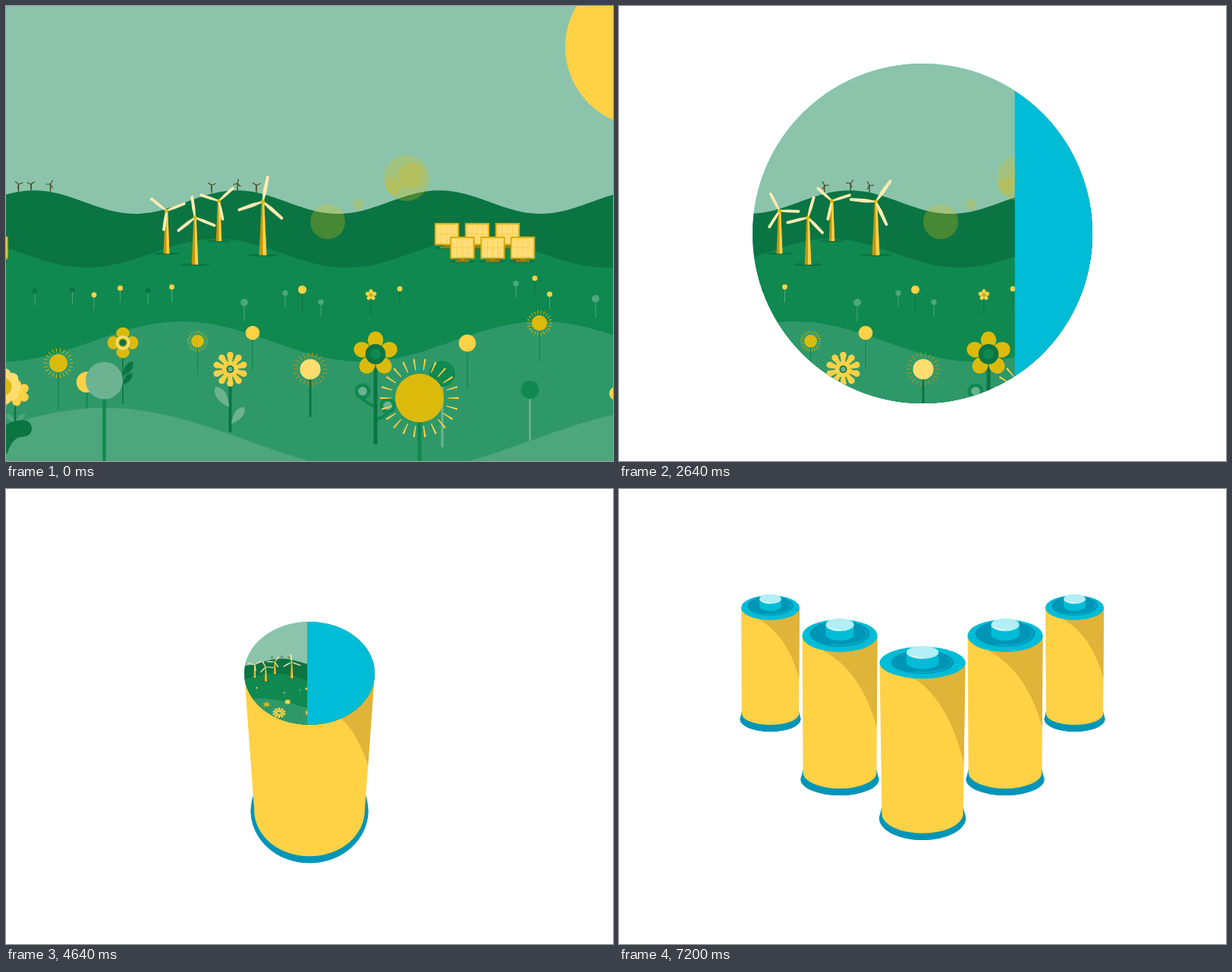
Recreate the animation shown at these times as an HTML page with a canvas. Size 800x600 px, loop 8 s.

```html
<!DOCTYPE html>
<html lang="en">
<head>
<meta charset="utf-8">
<title>Green energy</title>
<style>
  html, body { margin: 0; overflow: hidden; background: #fff; }
  canvas { display: block; }
</style>
</head>
<body>
<canvas id="stage" width="800" height="600"></canvas>
<script>
const ctx = document.getElementById('stage').getContext('2d');
const TAU = Math.PI * 2, RAD = Math.PI / 180, LOOP = 8000;
const SKY = '#8bc4aa', DARK = '#0b7443', GREEN = '#0f894f', MID = '#2f9869', LIGHT = '#4da67c', PALE = '#6db391';
const YELLOW = '#ffd145', SOFT = '#ffdc70', GOLD = '#dcba0c', CREAM = '#fdebb2', SHADE = '#dfb439';
const CYAN = '#00bcd6', BLUE = '#0095b7', ICE = '#b2eef6';

// Smooth monotone curve through [time, value] keys
function track(t, ...keys) {
  const last = keys.length - 1;
  if (t <= keys[0][0]) return keys[0][1];
  if (t >= keys[last][0]) return keys[last][1];
  const i = keys.findIndex(k => k[0] > t) - 1;
  const slope = j => (keys[j + 1][1] - keys[j][1]) / (keys[j + 1][0] - keys[j][0]);
  const tangent = j => {
    if (j === 0 || j === last) return 0;
    const a = slope(j - 1), b = slope(j);
    return a * b > 0 ? 2 * a * b / (a + b) : 0;
  };
  const [t0, v0] = keys[i], [t1, v1] = keys[i + 1], h = t1 - t0, u = (t - t0) / h;
  return v0 + (v1 - v0) * u * u * (3 - 2 * u)
    + h * u * (1 - u) * (tangent(i) * (1 - u) - tangent(i + 1) * u);
}

function ellipse(x, y, rx, ry, color, angle = 0) {
  ctx.fillStyle = color;
  ctx.beginPath();
  ctx.ellipse(x, y, rx, ry, angle, 0, TAU);
  ctx.fill();
}
const circle = (x, y, r, color) => ellipse(x, y, r, r, color);

function polygon(color, ...points) {
  ctx.fillStyle = color;
  ctx.beginPath();
  points.forEach(p => ctx.lineTo(...p));
  ctx.fill();
}

function line(x0, y0, x1, y1, width, color) {
  ctx.strokeStyle = color;
  ctx.lineWidth = width;
  ctx.beginPath();
  ctx.moveTo(x0, y0);
  ctx.lineTo(x1, y1);
  ctx.stroke();
}

function box(x, y, w, h, color) {
  ctx.fillStyle = color;
  ctx.fillRect(x, y, w, h);
}

function hill(crestX, mid, height, period, color) {
  ctx.fillStyle = color;
  ctx.beginPath();
  ctx.moveTo(0, 600);
  for (let x = 0; x <= 800; x += 5) ctx.lineTo(x, mid - height * Math.cos(TAU * (x - crestX) / period));
  ctx.lineTo(800, 600);
  ctx.fill();
}

function around(x, y, count, start, draw) {
  for (let i = 0; i < count; i++) {
    ctx.save();
    ctx.translate(x, y);
    ctx.rotate(start * RAD + i * TAU / count);
    draw();
    ctx.restore();
  }
}

const petals = (x, y, count, start, distance, rx, ry, color) =>
  around(x, y, count, start, () => ellipse(distance, 0, rx, ry, color));

function rays(x, y, r, color) {
  const width = .5 + r * .06;
  around(x, y, 22, 0, () =>
    polygon(color, [r * 1.16, -width / 4], [r * 1.62, -width / 2], [r * 1.62, width / 2], [r * 1.16, width / 4]));
}

function leaf(x0, y0, x1, y1, color) {
  const mx = x0 * .3 + x1 * .7, my = y0 * .3 + y1 * .7, dx = (y1 - y0) * .4, dy = (x0 - x1) * .4;
  ctx.fillStyle = color;
  ctx.beginPath();
  ctx.moveTo(x0, y0);
  ctx.quadraticCurveTo(mx + dx, my + dy, x1, y1);
  ctx.quadraticCurveTo(mx - dx, my - dy, x0, y0);
  ctx.fill();
}

function turbine(x, y, height, length, angle) {
  const base = y + height, w = height * .07;
  ellipse(x, base, height * .3, 1.7, DARK);
  polygon('#c3960f', [x - 1.7, y], [x + 1.7, y], [x + w, base], [x - w, base]);
  polygon(YELLOW, [x - .2, y], [x + 1.7, y], [x + w, base], [x, base]);
  around(x, y, 3, angle, () => {
    ctx.fillStyle = CREAM;
    ctx.beginPath();
    ctx.moveTo(0, -1);
    ctx.lineTo(length * .4, -length * .07);
    ctx.lineTo(length - 2, -1.9);
    ctx.arc(length - 2, 0, 1.9, -TAU / 4, TAU / 4);
    ctx.lineTo(length * .4, length * .07);
    ctx.lineTo(0, 1);
    ctx.fill();
  });
  circle(x, y, 2.5, GOLD);
}

function farTurbine(x, y, angle) {
  const color = '#4a4a22';
  line(x, y, x, y + 10, 1.4, color);
  around(x, y, 3, angle, () => line(0, 0, 6, 0, 1.2, color));
}

function solarPanel(x, y) {
  ellipse(x, y + 33, 17, 1.8, DARK);
  box(x - 3, y + 29, 6, 4, '#a37d0a');
  box(x - 9, y + 31, 18, 2.5, '#a37d0a');
  box(x - 16.2, y, 32.4, 29.5, '#d9a90e');
  box(x - 14.5, y + 1.8, 29, 26, YELLOW);
  for (let i = 0; i < 8; i++) {
    const cx = x - 13.6 + (i % 4) * 7, cy = y + 2.8 + (i >> 2) * 12.6;
    box(cx, cy, 6, 11.5, '#ffdd7a');
  }
}

const solarFarm = x => {
  for (const dx of [0, 40, 80]) solarPanel(x + dx, 286);
  for (const dx of [20.5, 60.5, 100]) solarPanel(x + dx, 304);
};

// x, y, radius, stem end, head colour
const sprouts = [
  [38, 376, 3.4, 395, DARK], [87.5, 374, 3.2, 393, DARK], [116, 381, 3.4, 401, YELLOW],
  [150.5, 372, 3.6, 390, YELLOW], [187, 375.5, 3.4, 394, DARK], [218.5, 370.5, 3.4, 391, YELLOW],
  [314, 391, 5, 416, LIGHT], [368, 378.5, 3.7, 397, LIGHT], [390.5, 374, 5.5, 404, YELLOW],
  [415, 390.5, 3.7, 409, LIGHT], [519, 373, 3.4, 395, YELLOW], [672, 366, 3.8, 385, LIGHT],
  [697, 359, 3.5, 380, YELLOW], [716.5, 380, 3.5, 400, YELLOW], [777, 386, 5, 411, LIGHT]
];

function lollipop(x, y, r, end, color, stem, width) {
  line(x, y, x, end, width, stem);
  circle(x, y, r, color);
}

function sunflower(x, y, r, end) {
  lollipop(x, y, r, end, GOLD, GREEN, 1.3);
  rays(x, y, r, GOLD);
}

function curl(x, y, stemX, stemY) {
  ctx.strokeStyle = GREEN;
  ctx.lineWidth = 4;
  ctx.beginPath();
  ctx.moveTo(x + (x < stemX ? -8 : 8), y);
  ctx.quadraticCurveTo(x, y + 15, stemX, stemY);
  ctx.stroke();
  circle(x, y, 10.5, GREEN);
  circle(x, y, 5.8, PALE);
}

function flowers() {
  for (const [x, y, r, end, color] of sprouts)
    lollipop(x, y, r, end, color, [390.5, 519, 697].includes(x) ? DARK : LIGHT, 1);
  line(481, 381, 481, 409, 1, DARK);
  petals(481, 381, 5, -90, 4.6, 2.9, 2.6, YELLOW);
  circle(481, 381, 1.8, GOLD);

  hill(232, 442.5, 26.5, 474, MID);
  hill(130, 572.8, 42.8, 750, LIGHT);

  sunflower(69, 471, 12, 532);
  sunflower(252.5, 442, 8.5, 485);
  sunflower(703, 418, 10.2, 469);
  lollipop(325, 431, 9.3, 480, YELLOW, GREEN, 1.3);
  lollipop(608, 444.5, 11.3, 506, YELLOW, GREEN, 1.3);
  lollipop(804, 511, 9, 560, YELLOW, GREEN, 1.3);
  lollipop(106.5, 496, 13.7, 530, YELLOW, GREEN, 2);
  lollipop(690.5, 506, 12, 573, GREEN, PALE, 2.5);
  lollipop(575, 485, 17, 582, GREEN, PALE, 3);
  lollipop(401, 479, 13.6, 542, SOFT, DARK, 3);
  rays(401, 479, 13.6, '#b3961c');

  // Four gold petals with leaves
  line(154, 444, 154, 525, 1.5, DARK);
  leaf(154, 488, 167, 469, DARK);
  leaf(154, 500, 166, 484, DARK);
  petals(154, 444, 4, 0, 12.5, 7.8, 8.7, GOLD);
  circle(154, 444, 9.5, SOFT);
  circle(154, 444, 6.2, GOLD);
  circle(154, 444, 4.6, DARK);

  lollipop(129.5, 494, 24.5, 600, PALE, GREEN, 4.5);

  // Ten yellow petals
  line(295.5, 479, 295.5, 562, 4, DARK);
  leaf(294, 529, 276, 502, PALE);
  leaf(297, 551, 314, 529, PALE);
  around(295.5, 479, 10, -90, () => {
    polygon(YELLOW, [6, -2], [19, -4], [19, 4], [6, 2]);
    circle(18.8, 0, 4.2, YELLOW);
  });
  circle(295.5, 479, 10.5, YELLOW);
  circle(295.5, 479, 5, DARK);
  circle(295.5, 479, 3.2, PALE);

  // Five gold petals with curled leaves
  curl(470, 508, 487, 528);
  curl(503, 527, 487, 545);
  line(487, 459, 487, 578, 5, DARK);
  petals(487, 459, 5, -90, 18.5, 11.2, 10.2, GOLD);
  circle(487, 459, 13.3, DARK);
  circle(487, 459, 7, GREEN);

  lollipop(545, 517, 32, 600, GOLD, GREEN, 5);
  rays(545, 517, 32, YELLOW);

  // Cluster at the left edge
  line(12, 515, 12, 548, 2.5, DARK);
  leaf(12, 549, 25, 538, LIGHT);
  leaf(12, 549, 0, 538, LIGHT);
  petals(14, 510, 6, 30, 11, 6.5, 6, YELLOW);
  circle(14, 510, 9, YELLOW);
  petals(-4, 502, 9, 0, 16, 8, 8, SOFT);
  circle(-4, 502, 16, SOFT);
  circle(-4, 502, 11.5, GOLD);
  ctx.strokeStyle = DARK;
  ctx.lineWidth = 22;
  ctx.lineCap = 'round';
  ctx.beginPath();
  ctx.moveTo(23, 557);
  ctx.quadraticCurveTo(2, 556, -8, 584);
  ctx.stroke();
  ctx.lineCap = 'butt';
}

function landscape(t) {
  const spin = t / 10;
  box(0, 0, 800, 600, SKY);
  circle(841.6, 54, 104.6, YELLOW);
  for (const [x, y, angle] of [[16.5, 235, -20], [33, 235, -35], [58.5, 235, -60],
    [271, 236.5, -25], [305, 234, -75], [330, 236.5, -25]])
    farTurbine(x, y, spin + angle);
  hill(304, 258.6, 15.4, 267, DARK);
  hill(278, 326, 19, 342, GREEN);
  turbine(280.5, 257, 53, 26.5, spin - 42);
  turbine(211.5, 270, 56.5, 27, spin - 22);
  turbine(249, 279, 62, 29.5, spin + 22);
  turbine(338.5, 258, 70.5, 35, spin + 41);
  solarFarm(581);
  solarFarm(-113.5);
  flowers();
  const haze = 'rgba(221,187,17,.28)';
  for (const [x, y, r] of [[528, 227, 30], [534, 223.5, 17], [511, 237, 11], [464, 262, 7], [424, 284.5, 23]])
    circle(x, y, r, haze);
}

// Open-topped tube: sloping sides and a rounded bottom
function tube(x, top, topR, bottom, bottomR, bottomH, color) {
  ctx.fillStyle = color;
  ctx.beginPath();
  ctx.moveTo(x + topR, top);
  ctx.ellipse(x, bottom, bottomR, bottomH, 0, 0, Math.PI);
  ctx.lineTo(x - topR, top);
  ctx.fill();
}

function battery(b, drawLid) {
  const { x, y, rx, ry, baseR, baseY, baseH, lift, shade, knob, well, dip } = b;
  const bottomR = baseR * .94, bottomY = baseY - lift;
  ellipse(x, baseY, baseR, baseH, BLUE);
  tube(x, baseY - 15 * baseR / 57, bottomR, baseY, baseR, baseH, BLUE);
  tube(x, y, rx, bottomY, bottomR, Math.max(1, baseH - 9 + lift), YELLOW);

  const endX = x + rx + (bottomR - rx) * .67, endY = y + (bottomY - y) * .67;
  const startY = y + ry * Math.sqrt(1 - shade * shade);
  ctx.fillStyle = SHADE;
  ctx.beginPath();
  ctx.moveTo(x + shade * rx, startY);
  ctx.quadraticCurveTo(x + (.65 + .15 * shade) * rx, startY + (endY - startY) * .27, endX, endY);
  ctx.lineTo(x + rx, y);
  ctx.fill();

  ellipse(x, y, rx, ry, CYAN);
  if (drawLid) drawLid();
  if (well <= 0) return;
  const wellH = well * ry / rx, wy = y - dip;
  ellipse(x, wy - .7, well, wellH, BLUE);
  ctx.strokeStyle = CYAN;
  ctx.lineWidth = 1;
  ctx.beginPath();
  ctx.ellipse(x, wy - .7, well * .9, wellH * .88, 0, -.5, 1.9);
  ctx.stroke();
  if (knob <= 0) return;
  const w = rx * .375, h = ry * .4;
  tube(x, y - knob, w, wy, w, h, CYAN);
  ellipse(x, y - knob, w, h, ICE);
  ctx.strokeStyle = '#fff';
  ctx.beginPath();
  ctx.ellipse(x, y - knob, w * .88, h * .82, 0, 1.5, 2.8);
  ctx.stroke();
}

function mainBattery(t) {
  const rx = track(t, [860, 510], [1200, 426], [1680, 237], [2640, 224], [3360, 207], [3880, 171],
    [4200, 139], [4640, 86], [5040, 70], [6000, 56.5]);
  const baseR = track(t, [3360, 155], [3880, 131], [4200, 104], [4640, 77.5], [5040, 66], [6000, 57]);
  return {
    x: 400, rx, baseR,
    y: track(t, [2640, 300], [3360, 293.5], [3880, 279.5], [4200, 261], [4640, 243], [5040, 238], [6000, 229]),
    ry: rx * track(t, [3000, 1], [3880, .991], [4200, .93], [4640, .79], [5040, .58], [6000, .372]),
    baseY: track(t, [3360, 300], [3880, 337], [4200, 388], [4640, 424], [5040, 433], [6000, 434]),
    baseH: baseR * track(t, [3880, 1], [4200, .97], [4640, .895], [5040, .74], [6000, .51]),
    lift: track(t, [4640, 0], [6000, 6]),
    shade: track(t, [4640, .48], [6000, -.2]),
    knob: track(t, [5300, 0], [5850, 13.5]),
    well: track(t, [5200, 0], [5800, 41.5]),
    dip: 0
  };
}

const inner = { x: 109, y: 193.5, rx: 49.5, ry: 21.5, baseR: 51.5, baseY: 383, baseH: 21,
  lift: 9, shade: -.46, knob: 14.5, well: 39.5, dip: 2 };
const outer = { x: 200.5, y: 156.5, rx: 38.5, ry: 16.3, baseR: 40, baseY: 303.5, baseH: 16.5,
  lift: 7, shade: -.4, knob: 11.5, well: 30.5, dip: 2 };

function pair(front, goal, t, start, end) {
  const u = Math.min(1, (t - start) / (end - start));
  if (u <= 0) return;
  const p = 1 - (1 - u * u) ** 5.5;
  for (const side of [-1, 1]) {
    const b = {};
    for (const key in front) b[key] = front[key] + (goal[key] - front[key]) * p;
    b.x = 400 + side * goal.x * p;
    battery(b);
  }
}

function lid(t, { y, rx, ry }) {
  const wipe = track(t, [1900, 820], [2640, 522], [3100, 432], [3880, 401], [4640, 392], [5000, 300], [5300, 170]);
  if (wipe <= 170) return;
  const scale = Math.min(1, rx / 224);
  ctx.save();
  ctx.beginPath();
  ctx.ellipse(400, y, rx, ry, 0, 0, TAU);
  ctx.clip();
  ctx.translate(400, y - Math.min(2, (1 - scale) * 9));
  ctx.scale(scale, scale * ry / rx);
  ctx.translate(-400, -300);
  landscape(t);
  box(wipe, 0, 800, 600, CYAN);
  ctx.restore();
}

function frame() {
  const t = performance.now() % LOOP;
  box(0, 0, 800, 600, '#fff');
  const front = mainBattery(t);
  pair(front, outer, t, 5870, 7200);
  pair(front, inner, t, 5760, 7100);
  battery(front, () => lid(t, front));
  requestAnimationFrame(frame);
}
frame();
</script>
</body>
</html>
```
